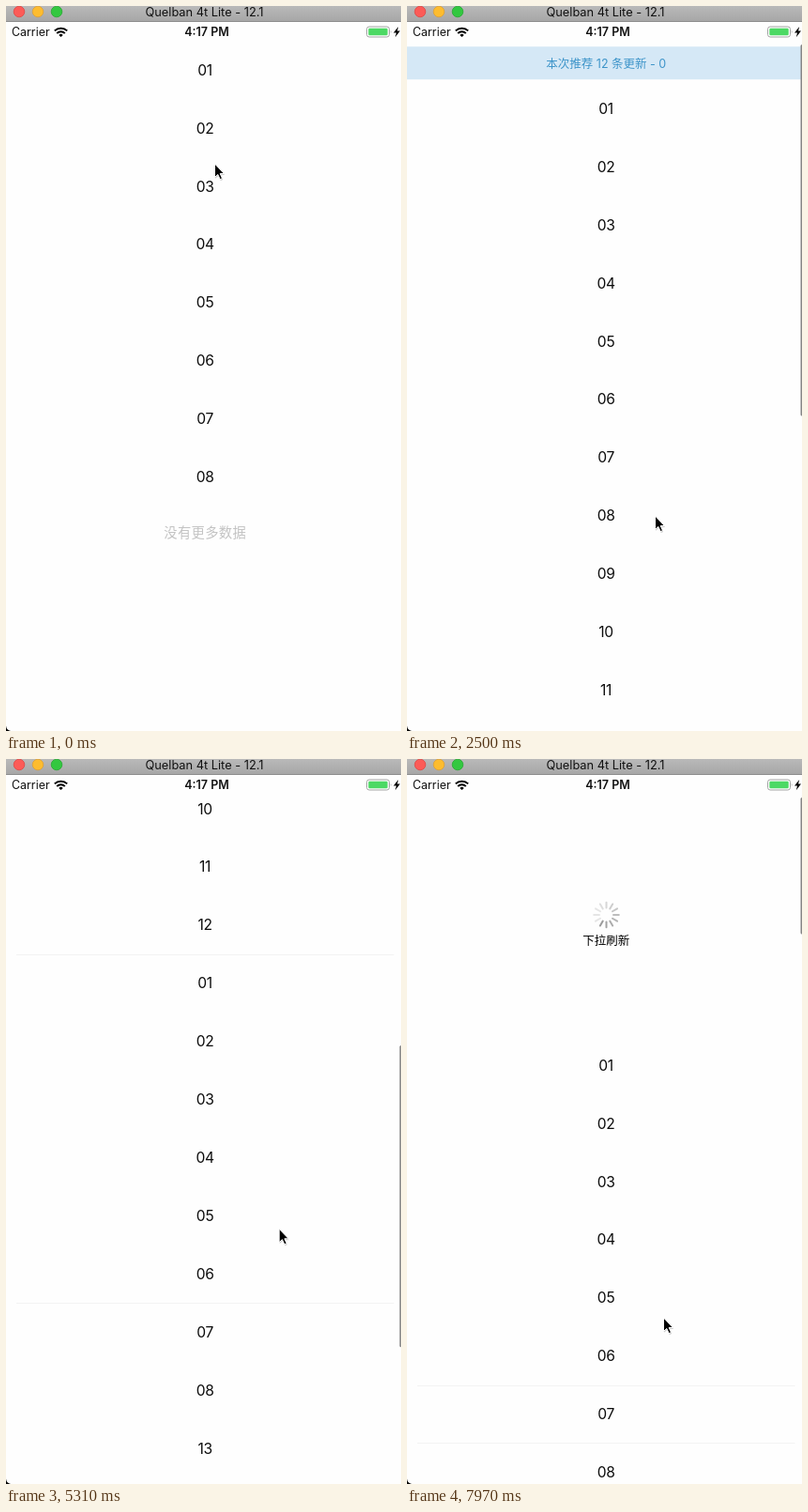
Animation of 421x772 px, one loop 8 s. Source, as an HTML page:

```html
<!DOCTYPE html>
<html lang="zh">
<head>
<meta charset="utf-8">
<title>Pull to refresh</title>
<style>
html, body { margin: 0; width: 100%; height: 100%; overflow: hidden; background: #fefefe; }
svg { display: block; width: 421px; height: 772px; }
text { font-family: Inter, "Noto Sans CJK SC", "Noto Sans CJK", "Noto Sans", sans-serif; }
.mid { text-anchor: middle; }
.row { font-size: 15.6px; letter-spacing: -.3px; fill: #0c0c0c; }
.sep { stroke: #f3f3f3; }
</style>
</head>
<body>
<svg id="stage" viewBox="0 0 421 772">
  <defs>
    <linearGradient id="chrome" x2="0" y2="1">
      <stop offset="0" stop-color="#b9b9b9"/>
      <stop offset="1" stop-color="#a7a7a7"/>
    </linearGradient>
    <path id="arrow" d="M0 0V14.4L3.3 11.4 5.7 16.6 8 15.6 5.7 10.5H10z"/>
  </defs>
  <rect width="421" height="772" fill="#fefefe"/>
  <g id="list"></g>
  <g id="tip">
    <rect id="tipBar" y="-35" width="421" height="35" fill="#d5e8f6"/>
    <text class="mid" x="212.3" y="-12.6" font-size="12.5" fill="#3d94c9">本次推荐 12 条更新 - 0</text>
  </g>
  <g id="pull">
    <text id="pullText" class="mid" x="212.3" y="4.7" font-size="12.5">下拉刷新</text>
    <g id="pullSpin" transform="translate(212.5 -27)"></g>
  </g>
  <g id="footer">
    <text id="done" class="mid" x="212.2" y="5.4" font-size="14.3" letter-spacing=".35" fill="#c3c3c3">没有更多数据</text>
    <g id="loading">
      <g id="footSpin" transform="translate(178 0)"></g>
      <text x="193.4" y="6" font-size="16.4" fill="#0c0c0c">加载中...</text>
    </g>
  </g>
  <rect id="bar" x="419.5" width="3" rx="1.5" fill="#858585"/>

  <rect y="17" width="421" height="20" fill="#fefefe"/>
  <rect width="421" height="16" fill="url(#chrome)"/>
  <rect y="16" width="421" height="1" fill="#8d8d8d"/>
  <g stroke-width=".8">
    <circle cx="14" cy="6" r="5.8" fill="#fc5b57" stroke="#df4744"/>
    <circle cx="34" cy="6" r="5.8" fill="#fdbc2f" stroke="#dea034"/>
    <circle cx="54" cy="6" r="5.8" fill="#33c840" stroke="#27a932"/>
  </g>
  <text class="mid" x="211.5" y="11" font-size="12.8" fill="#111">Quelban 4t Lite - 12.1</text>
  <text x="6" y="32" font-size="12.4" fill="#111">Carrier</text>
  <g fill="none" stroke="#000" stroke-width="2">
    <path d="M51.8 26.4a9.6 9.6 0 0 1 13.4 0M54.2 29.1a6 6 0 0 1 8.6 0"/>
    <path d="M56.3 30.9a3.2 3.2 0 0 1 4.4 0L58.5 33z" fill="#000" stroke="none"/>
  </g>
  <text class="mid" x="214" y="32" font-size="12.5" font-weight="600" fill="#111">4:17 PM</text>
  <rect x="384.5" y="22" width="24" height="11" rx="2.6" fill="none" stroke="#a5a5a5"/>
  <rect x="386.3" y="23.7" width="20.4" height="7.6" rx="1.2" fill="#4cd964"/>
  <path d="M409.8 25.7q1.6 1.8 0 3.6z" fill="#a5a5a5"/>
  <path d="M418.2 22l-5.2 6.4h3l-1.2 4.8 5.2-6.6h-3z" fill="#000"/>
  <path d="M0 766.5Q.6 771 5 772H0z" fill="#000"/>
  <g id="cursor">
    <use href="#arrow" x=".6" y="1.4" opacity=".2"/>
    <use href="#arrow" stroke="#fff"/>
  </g>
</svg>
<script>
const LOOP = 8000, STEP = 147.5;
const ROW = 61.92, TOP = 37, TRACK_TOP = 41, TRACK = 728;
// Steps at which the list changes state
const REFRESHED = 16, TIP_END = 25, FLICK = 28, LOADED = 36;

const $ = id => document.getElementById(id);
const move = (el, x, y) => el.setAttribute("transform", `translate(${x} ${y})`);
const show = (el, on) => el.setAttribute("visibility", on ? "inherit" : "hidden");
const clamp = v => Math.max(0, Math.min(1, v));
const mix = (a, b, u) => a + (b - a) * u;
const smooth = u => u * u * (3 - 2 * u);
const random = seed => { const v = Math.sin(seed) * 43758.5453; return v - Math.floor(v); };
const limit = count => count * ROW - 666;

function add(parent, tag, attrs) {
  const el = document.createElementNS("http://www.w3.org/2000/svg", tag);
  for (const name in attrs) el.setAttribute(name, attrs[name]);
  return parent.appendChild(el);
}

// Each drag eases to its peak, then springs back to rest
const drags = [
  { from: 3, to: 7, peak: 136, rest: 0 },
  { from: 12, to: 15, peak: 145, rest: 36 },
  { from: 23, to: 23, peak: 36, rest: 0 },
  { from: FLICK, to: 31, peak: -limit(20) - 61.5, rest: -limit(20) },
  { from: 37, to: 41, peak: -limit(25), rest: -limit(25) },
  { from: 43, to: 48, peak: 76, rest: 0 },
  { from: 52, to: 54, peak: 258, rest: 258 }
];

// Turning points of the mouse: step, x, y
const turns = [
  [0, 222.5, 168], [3, 236, 40], [9, 298.5, 391], [12, 284, 200], [17, 264.5, 543],
  [25, 272, 600], [28, 272, 600], [31, 280.5, 254], [37, 292, 520],
  [41, 297.5, 348], [44, 272, 110], [48, 264, 227], [51, 266, 215], [54, 273.5, 595]
];

function spring(peak, rest, steps) {
  const gap = (peak - rest) * Math.exp(-1.52 * steps);
  return Math.abs(gap) < 2 ? rest : rest + gap;
}

function offsetAt(k) {
  let y = 0;
  drags.forEach(({ from, to, peak, rest }, i) => {
    if (k < from) return;
    const end = i + 1 < drags.length ? Math.min(k, drags[i + 1].from) : k;
    y = k < to ? mix(y, peak, smooth((k - from) / (to - from))) : spring(peak, rest, end - to);
  });
  return y;
}

function pointerAt(k) {
  const i = turns.findIndex(t => t[0] > k);
  if (i < 0) return turns[turns.length - 1].slice(1);
  const [k0, x0, y0] = turns[i - 1], [k1, x1, y1] = turns[i];
  const u = smooth((k - k0) / (k1 - k0));
  return [mix(x0, x1, u), mix(y0, y1, u)];
}

function makeSpinner(group, inner, outer, width) {
  return Array.from({ length: 12 }, (_, i) => add(group, "line", {
    y1: -inner, y2: -outer, stroke: "#9c9c9c", "stroke-width": width,
    "stroke-linecap": "round", transform: `rotate(${i * 30})`
  }));
}

function spin(ticks, head) {
  ticks.forEach((tick, i) => {
    const age = (head - i + 12) % 12;
    tick.setAttribute("opacity", Math.max(0.25, 1 - age * 0.085));
  });
}

const rows = Array.from({ length: 25 }, (_, i) => ({
  line: add($("list"), "line", { class: "sep", x1: 11, x2: 413.5 }),
  text: add($("list"), "text", { class: "row mid", x: 212.1, y: (i + 0.5) * ROW + 5.7 })
}));
const pullTicks = makeSpinner($("pullSpin"), 7.5, 13.3, 2);
const footTicks = makeSpinner($("footSpin"), 5.5, 9.8, 1.6);

// Eight old rows sit between the twelve new ones and the later five
function rowLabel(i, fresh) {
  const n = !fresh || i < 12 ? i + 1 : i < 20 ? i - 11 : i - 7;
  return String(n).padStart(2, "0");
}

function drawRows(off, count, fresh) {
  move($("list"), 0, TOP + off);
  rows.forEach(({ line, text }, i) => {
    text.textContent = rowLabel(i, fresh);
    show(text, i < count);
    // Hairlines thinner than a pixel show only now and then
    show(line, off !== 0 && i > 0 && i < count && random(i * 7 + off) < 0.2);
    const y = Math.round(TOP + off + i * ROW) + 0.5 - TOP - off;
    line.setAttribute("y1", y);
    line.setAttribute("y2", y);
  });
}

function drawPull(off, on) {
  show($("pull"), on);
  move($("pull"), 0, 64 + off / 2);
  $("pullText").setAttribute("opacity", clamp(off / 170));
  $("pullSpin").setAttribute("opacity", clamp((off - 76) / 74));
}

function drawBar(off, count, on, tipOn) {
  show($("bar"), on);
  // The footer is not part of the content while the tip is up
  const max = limit(count) - (tipOn ? 109 : 0);
  const over = Math.max(0, off, -off - max);
  const len = Math.max(0, 517000 / (max + TRACK) - 550 * over / (550 + over));
  $("bar").setAttribute("y", TRACK_TOP + (TRACK - len) * clamp(-off / max));
  $("bar").setAttribute("height", len);
}

function draw(time) {
  const k = Math.floor((time + 10) / STEP);
  const off = offsetAt(k);
  const fresh = k >= REFRESHED;
  const tipOn = fresh && k < TIP_END;
  const count = !fresh ? 8 : k < LOADED ? 20 : 25;
  const loading = count === 20;

  drawRows(off, count, fresh);
  drawPull(off, off > 0 && !tipOn);
  drawBar(off, count, tipOn || k > FLICK, tipOn);

  show($("tip"), tipOn);
  move($("tip"), 0, TOP + off);
  const inset = k === REFRESHED ? 10 : 0;
  $("tipBar").setAttribute("x", inset);
  $("tipBar").setAttribute("width", 421 - 2 * inset);

  move($("footer"), 0, TOP + off + count * ROW + 28.4);
  show($("loading"), loading);
  show($("done"), !loading);

  const head = (2 * k + 7) % 12;
  spin(pullTicks, head);
  spin(footTicks, head);
  move($("cursor"), ...pointerAt(k));
}

const start = performance.now();
function tick() {
  draw((performance.now() - start) % LOOP);
  requestAnimationFrame(tick);
}
tick();
</script>
</body>
</html>
```
